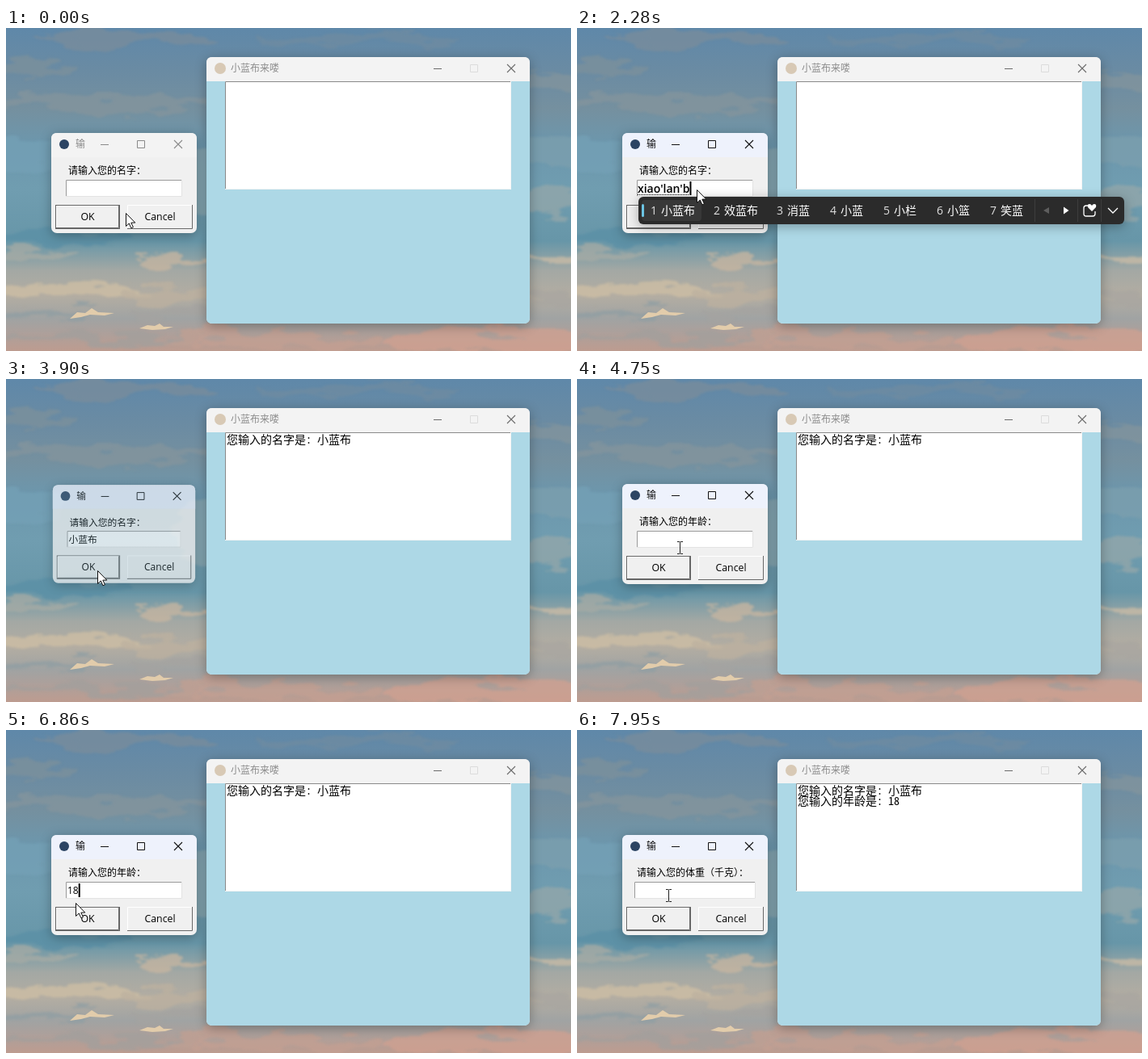
These frames come from a looping animation (699 px wide and 400 px high, 8000 ms). An HTML page:

```html
<!DOCTYPE html>
<html lang="zh-CN">
<head>
<meta charset="utf-8">
<title>Dialog demo</title>
<style>
html, body { margin: 0; width: 100%; height: 100%; overflow: hidden; }
svg { position: absolute; left: 0; top: 0; width: 699px; height: 400px; }
#sky { will-change: transform; }
text { font: 12px "Open Sans", "Noto Sans CJK SC", sans-serif; white-space: pre; }
.cjk { font-family: "Noto Sans CJK SC", sans-serif; }
.out { font: 14px "Noto Sans Mono CJK SC", "Noto Sans CJK SC", monospace; }
.typing { font-size: 14px; font-weight: 600; }
.pick { font-size: 14px; fill: #fff; }
.btn { font-size: 12.3px; }
.win { filter: drop-shadow(0 3px 7px rgba(0, 0, 0, .3)); }
</style>
</head>
<body>
<svg id="sky" viewBox="0 0 699 400">
  <defs>
    <linearGradient id="air" x2="0" y2="1">
      <stop offset="0" stop-color="#5f88a9"/>
      <stop offset=".13" stop-color="#6a8ba3"/>
      <stop offset=".25" stop-color="#75909f"/>
      <stop offset=".36" stop-color="#6c97ad"/>
      <stop offset=".5" stop-color="#709db0"/>
      <stop offset=".66" stop-color="#6796a8"/>
      <stop offset=".75" stop-color="#a3a8a4"/>
      <stop offset=".83" stop-color="#b3ada2"/>
      <stop offset=".9" stop-color="#a0a3a3"/>
      <stop offset="1" stop-color="#bd9c90"/>
    </linearGradient>
    <filter id="paint" x="-10%" y="-10%" width="120%" height="120%" color-interpolation-filters="sRGB">
      <feTurbulence type="fractalNoise" baseFrequency=".014 .05" numOctaves="4" seed="8"/>
      <feDisplacementMap in="SourceGraphic" scale="46" xChannelSelector="R" yChannelSelector="G"/>
      <feGaussianBlur stdDeviation="1.6"/>
    </filter>
  </defs>
  <rect width="699" height="400" fill="url(#air)"/>
  <g id="clouds" filter="url(#paint)"></g>
  <path d="M79 360l9-8 10 1 8-6 8 5 20 1-12 3-18-1-11 3zM165 372l10-4 9 1 6-3 5 4 12 0-10 3-16 1z" fill="#e2ccab"/>
</svg>
<svg id="stage" viewBox="0 0 699 400"></svg>
<script>
const LOOP = 8000, NAME = '小蓝布';
const get = id => document.getElementById(id);

// cx, cy, rx, ry, colour
get('clouds').innerHTML = [
  [150, 14, 110, 9, '#7a8d9b'], [30, 50, 60, 9, '#7d909b'], [430, 12, 130, 8, '#6f8ba0'],
  [110, 95, 150, 10, '#84959d'], [675, 70, 50, 12, '#83959d'], [20, 155, 50, 22, '#74a1b6'],
  [240, 190, 30, 45, '#8aa7b1'], [680, 150, 45, 25, '#7d9fae'], [680, 215, 40, 14, '#94a7aa'],
  [50, 258, 110, 12, '#5a8fa6'], [210, 285, 50, 6, '#c9b6a0'], [40, 285, 60, 6, '#a7aba5'],
  [680, 284, 40, 7, '#cdbda6'], [70, 325, 110, 8, '#cfbfa4'], [200, 330, 60, 8, '#bdb09f'],
  [30, 352, 80, 6, '#8f9ea3'], [220, 352, 60, 6, '#a4a3a0'], [680, 335, 40, 9, '#a9a6a1'],
  [120, 384, 130, 8, '#a29f9d'], [330, 385, 140, 9, '#c39f92'], [600, 388, 130, 14, '#d0a190']
].map(([x, y, rx, ry, c]) =>
  `<ellipse cx="${x}" cy="${y}" rx="${rx}" ry="${ry}" fill="${c}" opacity=".75"/>`).join('');

const dialogs = [
  { start: -999, focus: 450, end: 3870, label: '请输入您的名字：', x: 77, left: 74, width: 144 },
  { start: 4010, focus: 4010, end: 7140, label: '请输入您的年龄：', x: 77, left: 74, width: 144 },
  { start: 7260, focus: 7260, end: 9999, label: '请输入您的体重（千克）：', x: 74, left: 71, width: 150 }
];

// time, entry text, candidates while composing
const typing = [
  [0, ''],
  [1090, 'x', '下 想 新 小 学 先 像'],
  [1250, 'xi', '系 西 洗 希 喜 戏 细'],
  [1410, 'xia', '下 夏 吓 瞎 虾 峡 侠'],
  [1490, 'xiao', '小 笑 效 校 消 晓 萧'],
  [1710, "xiao'l", '小两口 小龙虾 效率 小路 笑脸 小鹿 消了'],
  [1880, "xiao'la", '小辣椒 小喇叭 笑啦 小蜡 小辣 消啦 小拉'],
  [2040, "xiao'lan", '小蓝 小栏 小篮 消蓝 小懒 小览 笑蓝'],
  [2200, "xiao'lan'b", NAME + ' 效蓝布 消蓝 小蓝 小栏 小篮 笑蓝'],
  [2360, "xiao'lan'bu", NAME + ' 小蓝 小栏 消蓝 小篮 小懒 笑蓝'],
  [2700, NAME],
  [4000, ''],
  [6310, '1'],
  [6470, '18'],
  [7260, '']
];

// time, x, y
const path = [
  [0, 148, 229], [250, 148, 229], [760, 148, 200], [3050, 148, 200], [3650, 113, 237],
  [4280, 113, 237], [4750, 127, 209], [5000, 131, 207], [6400, 131, 207],
  [6860, 86, 214], [7040, 104, 232], [7420, 104, 232], [7900, 113, 205], [8000, 113, 205]
];

const clamp = v => Math.max(0, Math.min(1, v));
const smooth = p => p * p * (3 - 2 * p);
const latest = (list, t) => list.filter(e => e[0] <= t).pop();

const box = (x, y, w, h, fill, more = '') =>
  `<rect x="${x}" y="${y}" width="${w}" height="${h}" fill="${fill}" ${more}/>`;
const line = (d, color, width = 1) =>
  `<path d="${d}" fill="none" stroke="${color}" stroke-width="${width}"/>`;
const shape = (d, color) => `<path d="${d}" fill="${color}"/>`;
const label = (x, y, s, cls = 'cjk', more = '') =>
  `<text x="${x}" y="${y}" class="${cls}" ${more}>${s}</text>`;
const dot = (x, y, r, color) => `<circle cx="${x}" cy="${y}" r="${r}" fill="${color}"/>`;

function bevel(x, y, w, h, light, dark) {
  const r = x + w - .5, b = y + h - .5;
  return line(`M${x + .5} ${b}V${y + .5}H${r}`, light) + line(`M${x} ${b}H${r}V${y}`, dark);
}

function frame(x, y, w, h, title) {
  return `<g class="win">${box(x, y, w, h, '#f0f0f0', 'rx="7"')}</g>` +
    shape(`M${x} ${y + 30}v-23q0-7 7-7h${w - 14}q7 0 7 7v23z`, title);
}

// Minimise, maximise and close marks, measured from the right window edge
function controls(right, y, color, maxColor) {
  return line(`M${right - 119} ${y + .5}h10`, color) +
    line(`M${right - 73.5} ${y - 4.5}h9v9h-9z`, maxColor) +
    line(`M${right - 28} ${y - 5}l10 10m0-10l-10 10`, color, 1.1);
}

function mainWindow(t) {
  return frame(248, 36, 400, 330, '#f3f3f3') +
    shape('M248 66h400v293q0 7-7 7h-386q-7 0-7-7z', '#add8e6') +
    dot(265, 50, 7, '#d8c9b5') +
    label(278, 54.3, NAME + '来喽', 'cjk', 'fill="#8c8c8c"') +
    controls(648, 50, '#6b6b6b', '#dcdcdc') +
    box(271, 66, 354, 134, '#fff') + bevel(271, 66, 354, 134, '#8a8a8a', '#f4f4f4') +
    (t >= 3900 ? label(273, 79.5, '您输入的名字是: ' + NAME, 'out') : '') +
    (t >= 7140 ? label(273, 92.5, '您输入的年龄是: 18', 'out') : '');
}

function button(x, w, caption, cx, isDefault, down) {
  const edge = isDefault ? box(x + .5, 219.5, w - 1, 29, 'none', 'stroke="#646464"') : '';
  const inset = isDefault ? 1 : 0, h = 30 - 2 * inset;
  const [a, b] = down ? ['#696969', '#fff'] : ['#fff', '#696969'];
  return box(x, 219, w, 30, '#f0f0f0') + edge +
    bevel(x + inset, 219 + inset, w - 2 * inset, h, a, b) +
    label(cx + down, 238.2 + down, caption, 'btn', 'text-anchor="middle"');
}

function entry(t, d) {
  const [, text, picks] = latest(typing, t);
  const cls = picks ? 'typing' : 'cjk';
  const wide = text ? measure(text, cls) : 0;
  const base = picks ? 203.5 : 203;
  const x = d.left + (picks ? 1 : 2);
  const blink = t >= d.focus && (t - d.focus) % 900 < 600;
  return box(d.left, 188, d.width, 21, '#fff') +
    bevel(d.left, 188, d.width, 21, '#9a9a9a', '#e3e3e3') +
    (text ? label(x, base, text, picks ? cls : '') : '') +
    (picks ? `<path d="M${x} 206.5h${wide}" stroke="#000" stroke-dasharray="1 1"/>` : '') +
    (blink ? box(x + wide, 190, 2, 17, '#000') : '');
}

const pen = document.createElement('canvas').getContext('2d');
function measure(s, cls) {
  pen.font = (cls === 'typing' ? '600 14px' : '12px') + ' "Open Sans", "Noto Sans CJK SC", sans-serif';
  return pen.measureText(s).width;
}

function dialog(t) {
  const d = dialogs.find(d => t >= d.start && t < d.end + 120);
  if (!d) return '';
  const show = smooth(clamp((t - d.start) / 130)) * (1 - clamp((t - d.end) / 120));
  const k = .92 + .08 * show;
  const active = t >= d.focus;
  const ink = active ? '#111' : '#8a8a8a';
  const down = (t > 3740 && t < 3870) || (t > 7060 && t < 7140) ? 1 : 0;
  return `<g opacity="${show}" transform="translate(146 192) scale(${k}) translate(-146 -192)">` +
    frame(56, 130, 180, 124, active ? '#eef2fc' : '#f3f3f3') +
    dot(72, 144, 6, '#2c4463') +
    label(86, 148.3, '输', 'cjk', `fill="${ink}"`) +
    controls(236, 144, ink, ink) +
    label(d.x, 181.3, d.label) +
    entry(t, d) +
    button(61, 80, 'OK', 101, true, down) +
    button(150, 81, 'Cancel', 190.5, false, 0) + '</g>';
}

function candidateBar(t) {
  const picks = latest(typing, t)[2];
  if (!picks) return '';
  let x = 91, items = '', first = 0;
  picks.split(' ').forEach((word, i) => {
    items += label(x, 231.2, i + 1, 'pick', 'opacity=".85"') + label(x + 13, 231.2, word, 'pick cjk');
    x += Math.max(66, 36 + 14 * word.length);
    first = first || x;
  });
  const end = x - 11;
  const rule = dx => line(`M${end + dx + .5} 212v28`, '#3d3d3d');
  return `<g class="win">${box(76, 209, end + 35, 34, '#2b2b2b', 'rx="6"')}</g>` +
    box(80, 213, first - 95, 26, '#383838', 'rx="4"') +
    box(80, 218, 3, 16, '#6cc5e4', 'rx="1.5"') + items + rule(0) + rule(53) + rule(82) +
    `<g transform="translate(${end} 226)">` +
    shape('M18-4v8l-7-4z', '#5e5e5e') + shape('M36-4.5v9l6.5-4.5z', '#fff') +
    line('M68-6h-4q-3 0-3 3v7q0 3 3 3h8q3 0 3-3v-3', '#fff', 1.3) +
    shape('M71 1l-5-5q-1-4 2-4 2 0 3 2 1-2 3-2 3 0 2 4z', '#fff') +
    line('M91-3l6 6 6-6', '#fff', 1.3) + '</g>';
}

function pointer(t) {
  const i = path.findIndex(p => p[0] > t), [t0, x0, y0] = path[i - 1], [t1, x1, y1] = path[i];
  const p = smooth((t - t0) / (t1 - t0));
  const x = x0 + (x1 - x0) * p, y = y0 + (y1 - y0) * p;
  const beam = t > 3900 && y < 210;
  return `<g transform="translate(${x} ${y})">` + (beam
    ? line('M-3-7.5h2.5q1 0 1 1v13q0 1-1 1h-2.5M4-7.5h-2.5q-1 0-1 1v13q0 1 1 1h2.5', '#222')
    : '<path d="M.5.5v16l3.8-3.5 2.6 5.8 2.5-1.1-2.6-5.6h5z" fill="#fff" stroke="#111"/>') + '</g>';
}

function draw(now) {
  const t = now % LOOP;
  get('stage').innerHTML = mainWindow(t) + dialog(t) + candidateBar(t) + pointer(t);
  requestAnimationFrame(draw);
}
const began = performance.now();
draw(0);
function tick() { return performance.now() - began; }
</script>
</body>
</html>
```
